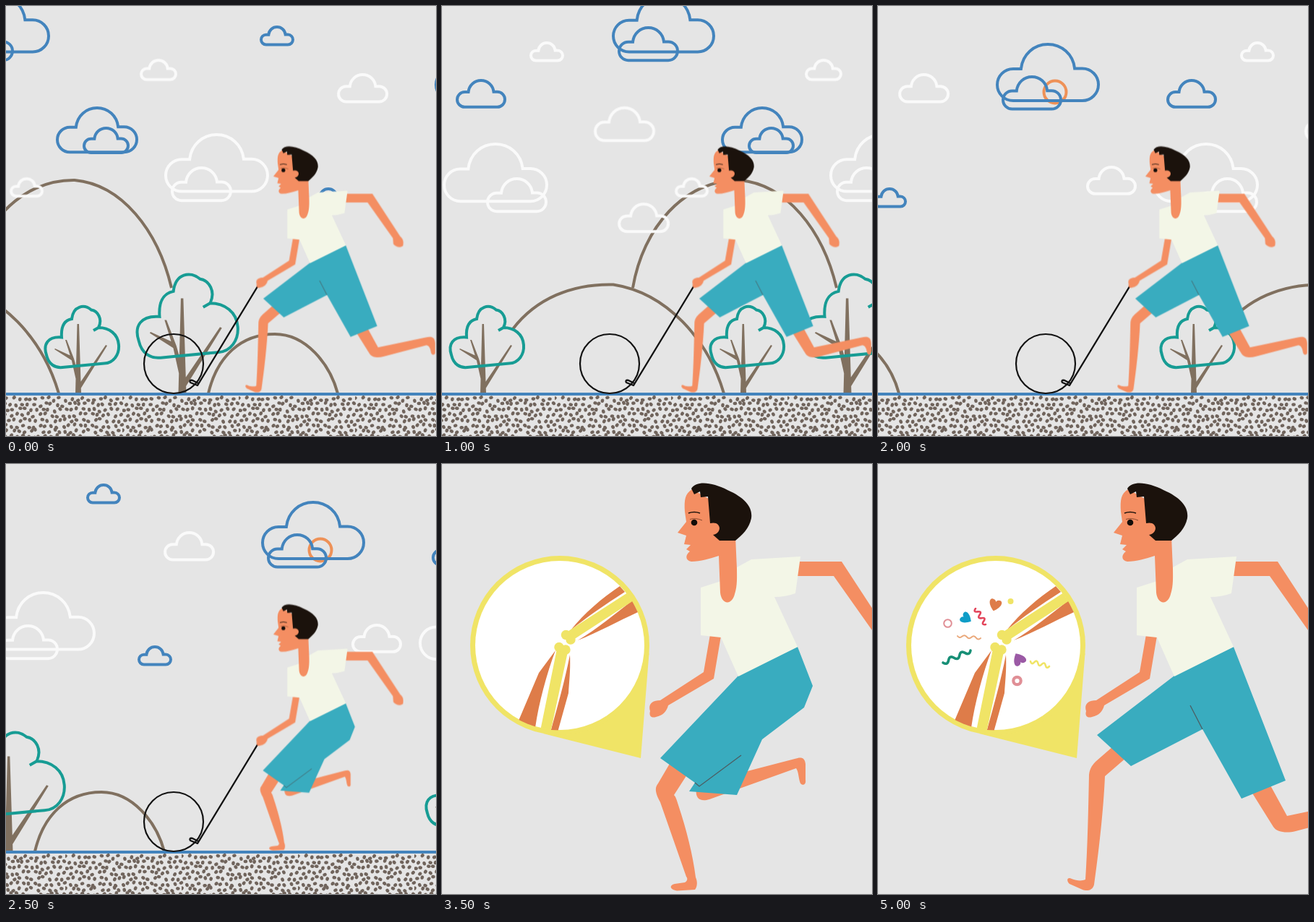
These frames come from a looping animation (595x595 px, 5500 ms). An HTML page:

```html
<!DOCTYPE html>
<html lang="en">
<head>
<meta charset="utf-8">
<title>Runner with hoop</title>
<style>
  html, body { margin: 0; width: 100%; height: 100%; overflow: hidden; background: #e5e5e5; }
  svg { display: block; width: 100vw; height: 100vh; }
  .anim { animation: 5500ms step-end infinite; }
  #scroll { animation-name: scroll; }
  #outdoors { animation-name: outdoors; }
  #closeup { animation-name: closeup; }
  #runner { animation-name: runner; }
  .stride { animation-name: stride; }
  .tuck { animation-name: tuck; }
  @keyframes scroll {
    0% { transform: translateX(0); }
    9.09% { transform: translateX(140px); }
    18.18% { transform: translateX(317px); }
    27.27% { transform: translateX(507px); }
    36.36% { transform: translateX(697px); }
    45.45%, 100% { transform: translateX(887px); }
  }
  @keyframes outdoors { 0% { opacity: 1; } 54.54%, 100% { opacity: 0; } }
  @keyframes closeup { 0% { opacity: 0; } 63.63%, 100% { opacity: 1; } }
  @keyframes runner {
    0% { opacity: 1; transform: translate(173px, 178.3px) scale(.604); }
    54.54% { opacity: 0; transform: none; }
    63.63%, 100% { opacity: 1; transform: none; }
  }
  @keyframes stride {
    0%, 18.18%, 36.36%, 54.54%, 72.72%, 90.9%, 100% { opacity: 1; }
    9.09%, 27.27%, 45.45%, 63.63%, 81.81% { opacity: 0; }
  }
  @keyframes tuck {
    0%, 18.18%, 36.36%, 54.54%, 72.72%, 90.9%, 100% { opacity: 0; }
    9.09%, 27.27%, 45.45%, 63.63%, 81.81% { opacity: 1; }
  }
  .line { fill: none; stroke-width: 4; }
  .line path, path.line, #cloud { vector-effect: non-scaling-stroke; }
  .brown { stroke: #80705f; }
  .skin { fill: #f48e62; }
  .shorts { fill: #39acbf; }
  .seam { fill: none; stroke: #4c5d62; stroke-width: 1.3; }
  .muscle { fill: #de7c49; }
  .bone { fill: #f0e466; }
</style>
</head>
<body>
<svg viewBox="0 0 595 595">
  <defs>
    <path id="cloud" d="M10.4,36.8 A10.4 10.4 0 0 1 10.4,16 H15.5 C16.5,6.5 24,0 33,0 S49.5,6.5 50.5,15.8 H55.5 A10.5 10.5 0 0 1 55.5,36.8Z"/>
    <path id="heart" d="M0,8 C-10,0 -9,-7 -4.5,-7 Q-1,-7 0,-4 Q1,-7 4.5,-7 C9,-7 10,0 0,8Z"/>
    <g id="tree">
      <path fill="#80705f" d="M-4,0 L-1.5,-96 H1 L4,0Z M-3,-18 L-9,-45 L-18,-74 L-16,-74 L-6,-48 L-1,-30Z M-33,-61 L-32,-62 L-8,-51 L-8,-45Z M2,-14 L38,-67 L40,-66 L3,-6Z"/>
      <path class="line" stroke="#179c94" d="M-23,-77.5 C-42,-79 -49,-68 -44,-53 C-41,-40 -32,-35 -22,-36 L36,-41.5 C49,-42 57,-54 56,-67 C55,-82 43,-91 28,-91 L21,-87 L28,-91 C34,-103 27,-114 18,-115.5 C8,-124 -7,-121 -9,-103 C-20,-101 -24,-91 -23,-77.5Z"/>
    </g>
    <pattern id="gravel" width="161" height="64" y="539" patternUnits="userSpaceOnUse"></pattern>
    <clipPath id="lens"><circle cx="163" cy="251" r="117.5"/></clipPath>
  </defs>

  <g id="outdoors" class="anim">
    <g id="scroll" class="anim">
      <g id="world">
        <g class="line brown">
          <path d="M-53,390 C-39,307 18,240 95,241 C160,247 210,310 229,390"/>
          <path d="M-219,447 C-187,405 -137,384 -80,385.5 C-6,397 51,461 73,536"/>
          <path d="M280,536 C292,485 325,454 372,454 C415,454 448,495 459,536"/>
        </g>
        <use href="#tree" transform="translate(100 536)"/>
        <use href="#tree" transform="translate(244 536) scale(1.37)"/>
        <use href="#tree" transform="translate(-260 536)"/>
        <circle class="line" stroke="#ee9157" cx="675" cy="119" r="15.5"/>
        <g id="clouds" class="line"></g>
      </g>
      <use href="#world" x="-1127"/>
      <rect x="-900" y="539" width="1500" height="56" fill="url(#gravel)"/>
    </g>
    <path class="line" stroke="#4384bd" d="M0,537 H595"/>
    <g fill="none" stroke="#111" stroke-width="2.2">
      <circle cx="232" cy="495" r="41"/>
      <path stroke-width="2.4" stroke-linejoin="round" d="M350,385 L265,525 L255,521 Q253,517 258,518 L266,522"/>
    </g>
  </g>

  <g id="closeup" class="anim">
    <path class="bone" d="M286.5,262 L275,407 L140,373Z"/>
    <circle class="bone" cx="163" cy="251" r="124"/>
    <circle fill="#fff" cx="163" cy="251" r="117"/>
    <g clip-path="url(#lens)">
      <g class="muscle">
        <path d="M178,230 C198,205 220,187 246,169 L253,177 C225,195 200,212 178,230Z"/>
        <path d="M188,244 C215,228 240,207 263,189 L271,205 C245,217 215,233 188,244Z"/>
        <path d="M157,258 L134,289 L106,355 L129,365 C134,330 145,290 157,258Z"/>
        <path d="M177,264 C178,285 176,300 175,317 L160,371 L150,371 C160,335 170,300 177,264Z"/>
      </g>
      <g class="bone">
        <path d="M172,233 L260,176 L268,187 L182,243Z M159,256 L174,260 L150,372 L136,369Z"/>
        <circle cx="171.5" cy="236.5" r="6.7"/><circle cx="178" cy="243" r="6.7"/>
        <circle cx="162" cy="253.5" r="6.7"/><circle cx="171" cy="257" r="6.7"/>
      </g>
    </g>
    <g class="anim stride">
      <use href="#heart" fill="#de7c49" transform="translate(162 195) rotate(15) scale(1.08)"/>
      <use href="#heart" fill="#0e9dc7" transform="translate(122 213.5) rotate(-58)"/>
      <use href="#heart" fill="#9b5aa5" transform="translate(195 270) rotate(150) scale(1.12)"/>
      <circle class="bone" cx="183.5" cy="190" r="4"/>
      <circle fill="none" stroke="#e08f96" stroke-width="2" cx="96.5" cy="220.5" r="5.3"/>
      <circle fill="none" stroke="#e08f96" stroke-width="4.2" cx="192.5" cy="300" r="5.2"/>
      <g id="streamers" fill="none" stroke-linecap="round"></g>
    </g>
  </g>

  <g id="runner" class="anim">
    <path class="skin" d="M492,135 H553 L617,233 C624,238 625,247 623,254 C616,260 606,256 601,250 L600,237 L542,155 H490Z"/>
    <path class="skin" d="M371,236 L386,238 L376,297 L313,334 C311,342 306,348 296,350 C290,352 286,349 288,342 C285,333 290,327 302,327 L362,288Z"/>
    <g class="anim stride">
      <g class="skin">
        <path d="M325,391 L344,406 L314,432 C312,480 305,540 299,582 C297,591 288,591 283,589 L265,581 C260,576 262,571 268,574 C275,577 283,577 287,575 C290,530 291,480 292,430 C293,420 298,415 302,411Z"/>
        <path d="M517,454 L542,443 L566,487 L675,464 C690,461 696,464 697,478 V500 C694,507 687,503 687,497 C686,490 683,483 677,482 L578,508 C566,511 552,510 547,502Z"/>
      </g>
      <path class="shorts" d="M410,293 L492,253 L564,438 L503,463 L449,367 L350,418 L303,375Z"/>
      <path class="seam" d="M432,334 L449,367"/>
    </g>
    <g class="anim tuck">
      <g class="skin">
        <path d="M316,413 L339,430 L321,458 C324,461 325,466 327,472 C338,505 347,540 351,572 C354,578 353,586 350,589 L325,590.5 C315,589 314,583 322,581 L336,579 C340,577 340,573 338,571 L302,468 C295,455 294,448 299,442Z"/>
        <path d="M415,427 L488,408 C497,405 502,406 503,415 V437 C504,443 500,446 496,442 C493,435 494,427 490,421 L370,464 C358,468 350,463 352,450Z"/>
      </g>
      <path class="shorts" d="M410,293 L492,253 L513,307 L501,337 L443,381 L408,458 L342,453 L350,441 L302,407Z"/>
      <path class="seam" d="M350,441 L356,446 L414,403"/>
    </g>
    <path fill="#f3f6e7" d="M358,171 L386,162 L408,143 L428,132 L496,128 L489,179 Q475,184 460,184 L492,253 L410,294 L386,240 L358,237Z"/>
    <path class="skin" d="M346,35 C336,41 335,50 336,66 L338,80 L326,95 L338,99 L335,111 L344,112 L338,118 L343,121 C336,126 337,134 345,135 C358,135 370,131 383,127 L385,178 C387,195 401,196 405,180 C409,168 408,155 408,145 L406,100 L390,60Z"/>
    <path fill="#1b120c" d="M345,34 C353,22 375,26 395,36 C420,47 430,60 428,75 C425,90 415,98 406,106 H384 L375,98 C388,96 387,78 371,82 L368,45 L358,46 L357,38 L349,42Z"/>
    <circle fill="#130d09" cx="349" cy="81" r="4.3"/>
    <path fill="none" stroke="#1b120c" stroke-width="1.5" d="M341,68 Q349,65 357,68"/>
    <path fill="none" stroke="#8a4b30" d="M343,76.5 Q351,74 360,78"/>
  </g>
</svg>
<script>
  const fill = (id, html) => document.getElementById(id).innerHTML = html;

  // Left, top and width of each cloud
  const blue = [[-82, -16, 143], [-74, 28, 85], [69, 139, 114], [106, 167, 65], [351, 27, 48],
    [593, 51, 144], [601, 96, 84], [-298, 101, 70], [422, 251, 48]];
  const white = [[185, 73, 52], [5, 237, 47], [458, 93, 71], [219, 176, 145], [228, 222, 85],
    [-196, 49, 48], [-107, 139, 85], [-316, 189, 146], [-256, 237, 85], [-74, 272, 72], [-409, 221, 70]];
  const cloud = color => ([x, y, w]) =>
    `<use href="#cloud" stroke="${color}" transform="translate(${x + 2} ${y + 2}) scale(${(w - 4) / 66})"/>`;
  fill('clouds', blue.map(cloud('#4384bd')).join('') + white.map(cloud('#fafafa')).join(''));

  let seed = 17;
  const rand = () => (seed = seed * 16807 % 2147483647) / 2147483647;
  const cols = 20;
  let dots = '';
  for (let r = 0; r < 8; r++) {
    for (let c = 0; c < cols; c++) {
      const x = (c + r % 2 / 2 + rand() * .5) * 161 / cols;
      const y = 5 + r * 7.4 + (rand() - .5) * 5;
      const turn = rand() * 180;
      for (const px of [x, x - 161])
        dots += `<ellipse rx="2.8" ry="2.3" transform="translate(${px} ${y}) rotate(${turn})"/>`;
    }
  }
  fill('gravel', `<g fill="#70645c">${dots}</g>`);

  // Wavy ribbon between two points
  const streamer = (x1, y1, x2, y2, color, width, high) => {
    const step = Math.hypot(x2 - x1, y2 - y1) / 5;
    const turn = Math.atan2(y2 - y1, x2 - x1) * 180 / Math.PI;
    return `<path stroke="${color}" stroke-width="${width}" transform="translate(${x1} ${y1}) rotate(${turn})"
      d="M0,0 q${step / 2},${high} ${step},0 ${`t${step},0 `.repeat(4)}"/>`;
  };
  fill('streamers',
    streamer(135, 200, 149, 222, '#e3455b', 2.6, 6) +
    streamer(110, 238, 142, 241, '#eaa87a', 2, 3.5) +
    streamer(90, 275, 128, 258, '#178f76', 3.6, 6) +
    streamer(211, 273, 237, 280, '#f0e466', 2.6, 5));
</script>
</body>
</html>
```
